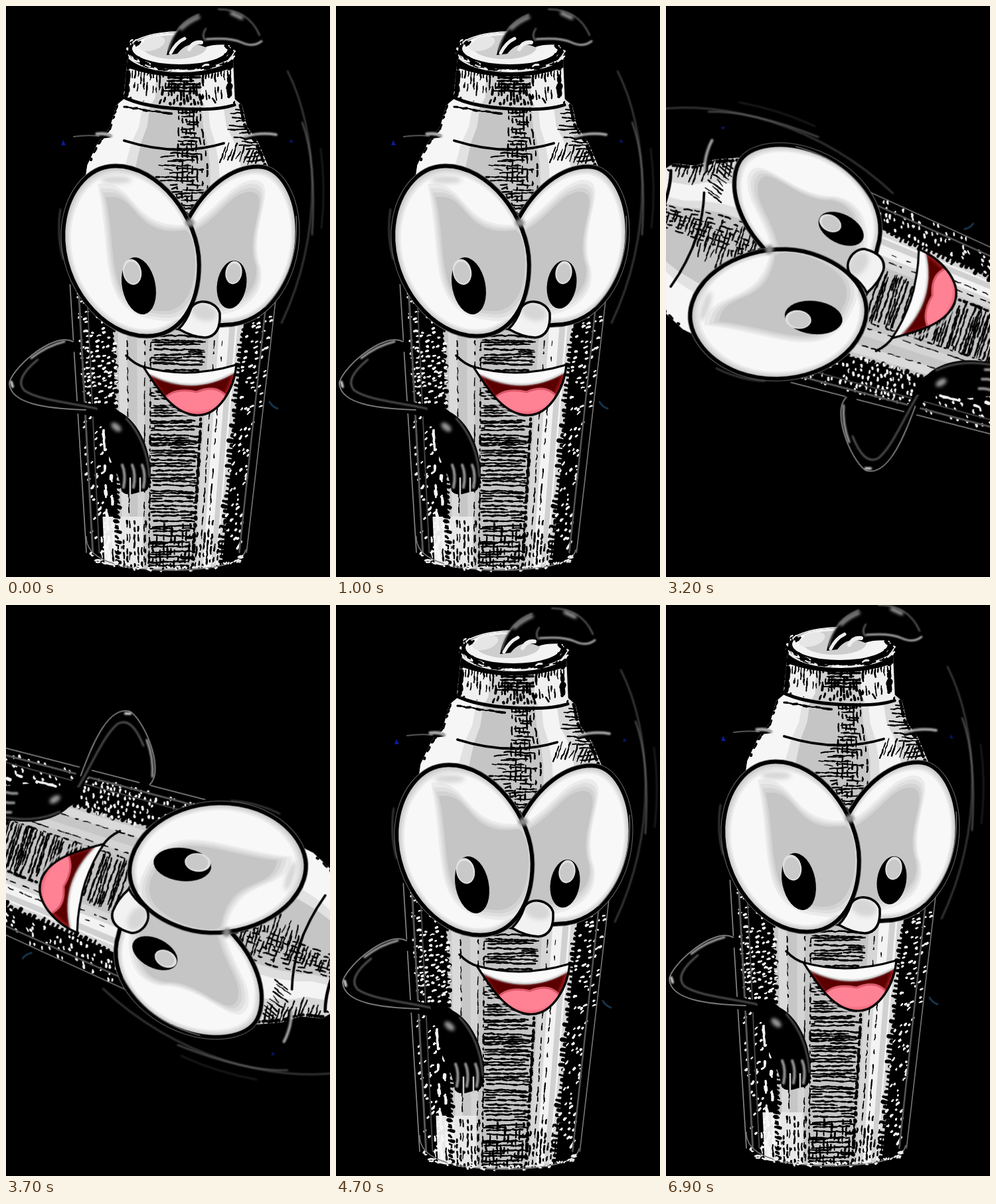
Animation, 488 px wide and 861 px high, one loop 7000 ms. Source, as an HTML page with a canvas:

```html
<!DOCTYPE html>
<html lang="en">
<head>
<meta charset="utf-8">
<title>Dancing shaker</title>
<style>
html, body { margin: 0; width: 100%; height: 100%; overflow: hidden; background: #000; }
canvas { display: block; width: 100%; height: 100%; }
</style>
</head>
<body>
<canvas id="stage" width="488" height="861"></canvas>
<script>
const W = 488, H = 861, LOOP = 7000, STEP = 100;
const stage = document.getElementById('stage').getContext('2d');
const art = document.createElement('canvas');
art.width = W; art.height = H;
const g = art.getContext('2d');
g.lineCap = g.lineJoin = 'round';

let seed = 71;
const rnd = () => (seed = (seed * 16807) % 2147483647) / 2147483647;
const jit = a => (rnd() - 0.5) * 2 * a;
const between = (a, b) => a + (b - a) * rnd();

// The bottle turns around a slightly leaning axis; u runs from -1 (left) to 1 (right).
const profile = [[84, 79], [138, 81], [150, 95], [182, 103], [206, 121], [240, 136], [420, 157], [860, 118]];
const axis = y => 263 - (y - 70) * 0.0275;
function half(y) {
  const i = Math.max(1, profile.findIndex(p => p[0] >= y));
  const [y0, w0] = profile[i - 1], [y1, w1] = profile[i];
  return w0 + (w1 - w0) * (y - y0) / (y1 - y0);
}
const at = (u, y) => axis(y) + u * half(y);

function region(u0, u1, y0, y1) {
  const path = new Path2D();
  for (let y = y0; y <= y1; y += 2) path.lineTo(at(u0, y), y);
  for (let y = y1; y >= y0; y -= 2) path.lineTo(at(u1, y), y);
  path.closePath();
  return path;
}

function fill(path, color) { g.fillStyle = color; g.fill(path); }
function line(path, color, w) { g.strokeStyle = color; g.lineWidth = w; g.stroke(path); }
function oval(x, y, rx, ry, turn, color) {
  g.beginPath(); g.ellipse(x, y, rx, ry, turn, 0, 7);
  g.fillStyle = color; g.fill();
}
function soft(r, draw) { g.filter = `blur(${r}px)`; draw(); g.filter = 'none'; }
function glow(d, color, w, r = 0.8) { soft(r, () => line(new Path2D(d), color, w)); }
function clipped(path, draw) { g.save(); g.clip(path); draw(); g.restore(); }
function scaled(path, k, x, y) {
  const out = new Path2D();
  out.addPath(path, new DOMMatrix([k, 0, 0, k, x * (1 - k), y * (1 - k)]));
  return out;
}

// Ragged pen stroke of uneven width.
function scratch(x1, y1, x2, y2, w, color = '#000') {
  const n = Math.max(2, Math.round(Math.hypot(x2 - x1, y2 - y1) / 5));
  g.strokeStyle = color;
  let x = x1, y = y1;
  for (let i = 1; i <= n; i++) {
    g.beginPath(); g.moveTo(x, y);
    x = x1 + (x2 - x1) * i / n + jit(0.8);
    y = y1 + (y2 - y1) * i / n + jit(0.8);
    g.lineTo(x, y);
    g.lineWidth = w * between(0.6, 1.4);
    g.stroke();
  }
}

// Broken upright strokes along the bottle wall.
function grain(u, y0, y1, gap, w, color) {
  for (let y = y0; y < y1; y += gap * between(0.6, 1.6)) {
    const end = Math.min(y1, y + gap * between(0.2, 0.8));
    scratch(at(u, y), y, at(u, end), end, w, color);
  }
}

function specks(u0, u1, y0, y1, chance, tilt) {
  for (let y = y0; y < y1; y += 7.5)
    for (let u = u0; u < u1; u += 0.055) {
      if (rnd() > chance) continue;
      const x = at(u, y) + jit(2), len = between(1, 5), top = y + jit(2.5);
      scratch(x, top, x + len * Math.cos(tilt), top + len * Math.sin(tilt), 2.7, '#f8f8f8');
    }
}

function lowerBody() {
  const shell = region(-1, 1, 380, 826);
  shell.ellipse(242, 826, 121, 24, 0, 0, Math.PI * 2, true);
  clipped(shell, () => {
    const bands = [[-0.6, -0.22, '#c6c6c6'], [-0.55, -0.46, '#dadada'], [-0.36, -0.28, '#d4d4d4'],
      [-0.22, 0.38, '#c4c4c4'], [0.36, 0.7, '#d6d6d6'], [0.46, 0.64, '#f3f3f3'], [0.56, 0.62, '#d0d0d0']];
    for (const [a, b, color] of bands) fill(region(a, b, 430, 858), color);
    fill(region(-0.78, -0.3, 770, 858), '#e8e8e8');

    for (let y = 488; y < 850; y += 7.6) {
      const l = at(-0.21, y), r = at(0.33, y);
      scratch(l + rnd() * 6, y + jit(2), r - rnd() * 10, y + jit(2), 2.5);
      if (rnd() < 0.6) scratch(l, y + 4, between(l, r), y + 4 + jit(1), 2.2);
      if (rnd() < 0.6) scratch(between(l + 30, r), y + 3, r, y + 3, 2.4);
      scratch(at(-0.6, y) - 4, y, at(-0.6, y) + rnd() * 4, y + 2, 5);
      scratch(at(0.7, y) - rnd() * 7, y, at(0.7, y) + 6, y + 2, 5);
    }
    grain(-0.22, 490, 845, 9, 2.4);
    grain(0.33, 585, 845, 8, 4);
    for (const u of [-0.46, -0.28, 0.42, 0.5]) grain(u, 505, 840, 17, 1.6);

    specks(-0.93, -0.58, 425, 600, 0.66, -0.3);
    specks(-0.94, -0.62, 600, 830, 0.33, -0.7);
    specks(0.73, 0.97, 470, 610, 0.5, -0.4);
    specks(0.71, 0.93, 610, 825, 0.45, -0.9);
    for (const u of [-0.66, -0.73]) grain(u, 640, 840, 26, 4, '#f4f4f4');
    for (let u = -0.85; u < 0.75; u += 0.045)
      grain(u, between(775, 825), 850, 14, 2.4, u < -0.55 && rnd() < 0.5 ? '#f8f8f8' : '#000');
  });
  for (const [u, color, w] of [[-1, '#8a8a8a', 1.6], [-0.92, '#555', 3], [-0.84, '#444', 2], [0.9, '#555', 2.5], [0.99, '#777', 1.6]])
    soft(0.6, () => line(region(u, u, 420, 824), color, w));
  glow('M121 800 Q120 848 242 851 Q356 850 361 820', '#777', 1.6, 0.5);
  for (let i = 0; i < 65; i++) {
    const a = between(0.25, 2.9);
    const x = 242 + 117 * Math.cos(a), y = 824 + 25 * Math.sin(a) + jit(4);
    scratch(x, y, x + rnd() * 4, y + jit(2), 2, '#eee');
  }
}

function shoulders() {
  const shape = region(-1, 1, 140, 338);
  fill(shape, '#d8d8d8');
  clipped(shape, () => {
    const bands = [[-1, -0.5, '#f6f6f6'], [-0.58, -0.46, '#e2e2e2'], [-0.46, 0.36, '#c5c5c5'],
      [0.36, 0.46, '#dedede'], [0.46, 0.7, '#f4f4f4']];
    for (const [a, b, color] of bands) fill(region(a, b, 140, 338), color);
    for (let y = 156; y < 330; y += 6) {
      const w = y < 205 ? 16 : 26;
      scratch(275 - w * rnd(), y + jit(2), 277 + w * rnd(), y + jit(2), 2.3);
      if (y > 215) scratch(between(223, 250), y, between(250, 275), y + jit(2), 2);
      const u = between(0.68, 0.9);
      if (y < 240) scratch(at(u, y), y, at(1, y), y + jit(3), 2);
    }
    for (let u = 0; u < 0.36; u += 0.055) grain(u, 154, 325, 16, 2.2);
    for (let x = 322; x < 382; x += 6) scratch(x, 240 - rnd() * 10, x + 8, between(206, 220), 2);
    for (const u of [-0.99, 0.97]) grain(u, 150, 240, 10, 4);
  });
  line(new Path2D('M174 136 Q205 152 262 155 T344 149'), '#000', 5);
  scratch(178, 152, 250, 163, 2.8);
  line(new Path2D('M178 203 Q258 228 328 207'), '#000', 3.8);
}

function neck() {
  const shape = new Path2D('M183 80 Q262 110 342 80 L345 147 Q262 162 177 136 Z');
  fill(shape, '#f0f0f0');
  clipped(shape, () => {
    fill(region(-0.45, 0.4, 84, 160), '#cfcfcf');
    for (let u = -0.96; u < 1; u += 0.058) {
      const mid = Math.abs(u - 0.04) < 0.4;
      grain(u, 98, mid ? 148 : between(122, 150), mid ? 15 : 26, mid ? 3.2 : 2.1);
    }
    for (let y = 98; y < 132; y += 5) scratch(between(236, 248), y, between(282, 300), y, 3);
    line(new Path2D('M182 86 Q262 114 343 86'), '#000', 13);
    for (const u of [-0.99, 0.93]) grain(u, 88, 148, 12, 7);
  });
}

function cap() {
  oval(263, 69, 83, 31, 0, '#e8e8e8');
  oval(263, 68, 79, 28, 0, '#000');
  oval(262, 64, 72, 24, 0, '#f3f3f3');
  oval(254, 62, 48, 18, 0, '#cecece');
  oval(220, 57, 20, 10, -0.3, '#e6e6e6');
  for (let i = 0; i < 95; i++) {
    const a = between(-0.5, 3.7), r = between(0.84, 1.05);
    const x = 263 + 82 * r * Math.cos(a), y = 68 + 29 * r * Math.sin(a);
    scratch(x, y, x - 9 * Math.sin(a), y + 4 * Math.cos(a), between(1.5, 4), rnd() < 0.75 ? '#000' : '#fff');
  }
}

function raisedArm() {
  glow('M424 98 C470 190 480 340 415 478', '#4d4d4d', 2);
  glow('M446 175 C466 230 464 300 461 345', '#777', 1.6);
  glow('M474 215 Q482 275 475 335', '#303030', 1.5);
  fill(new Path2D('M242 74 C250 30 290 3 330 3 C365 5 385 40 387 56 C365 66 325 52 300 62 Q275 50 258 72 Z'), '#000');
  glow('M245 67 Q254 27 290 13', '#777', 2.2);
  glow('M264 34 Q274 24 290 17', '#999', 5, 2);
  glow('M320 5 Q365 5 382 44', '#666', 2.2);
  glow('M340 11 L355 18', '#aaa', 5, 2);
  glow('M302 50 Q338 47 355 55 T385 53', '#aaa', 3, 1);
  glow('M300 52 Q294 44 301 34', '#777', 2, 1);
  glow('M248 71 Q256 55 269 49', '#eee', 5, 0.7);
  glow('M276 65 Q282 53 294 55', '#eee', 6, 0.7);
}

function hipArm() {
  line(new Path2D('M100 513 C60 520 14 555 14 572 C20 600 110 600 160 617'), '#000', 18);
  glow('M101 506 C70 490 5 550 5 570 C8 600 60 607 120 609', '#777', 2, 0.7);
  glow('M88 506 Q62 512 38 531', '#aaa', 3, 1);
  glow('M48 533 C25 552 16 568 28 580 C50 595 100 598 150 610', '#626262', 2.4, 1);
  glow('M8 567 L10 574', '#ccc', 4, 1.2);
  fill(new Path2D('M137 605 C185 600 215 650 218 700 Q218 735 205 732 L190 736 Q178 738 174 731 C168 690 150 690 149 640 Z'), '#000');
  soft(2.5, () => oval(166, 635, 9, 5, 0.7, '#999'));
  glow('M181 622 Q212 655 216 710', '#666', 2, 1);
  for (let i = 0; i < 3; i++) {
    const x = 178 + 15 * i;
    glow(`M${x - 3} 692 q6 14 2 34`, '#999', 4, 1.2);
    if (i) glow(`M${x - 6} 712 v24`, '#ccc', 2.5, 0.6);
  }
}

function brows() {
  line(new Path2D('M103 195 Q130 200 156 196 M360 200 Q380 195 405 196'), '#000', 5);
  glow('M102 197 Q122 194 140 196', '#555', 2, 0.7);
  glow('M137 193 Q150 191 158 196', '#aaa', 5, 1.2);
  glow('M360 197 Q383 190 407 194', '#aaa', 4, 1);
  fill(new Path2D('M86 202 l4 8 h-7 Z'), '#0b1b96');
  fill(new Path2D('M429 200 l4 6 h-6 Z'), '#0a145c');
  line(new Path2D('M397 597 Q402 605 409 607'), '#16334a', 3);
}

// Glossy eye: nested tones shrink from the rim, then grow around the iris field.
function eye(outline, field, cx, cy) {
  const shape = new Path2D(outline), inner = new Path2D(field);
  line(shape, '#686868', 9);
  line(shape, '#000', 7);
  clipped(shape, () => {
    ['#bcbcbc', '#d0d0d0', '#dedede', '#ebebeb', '#f8f8f8'].forEach((c, i) => fill(scaled(shape, 1 - i * 0.022, cx, cy), c));
    ['#ebebeb', '#dfdfdf', '#d3d3d3', '#c5c5c5'].forEach((c, i) => fill(scaled(inner, 1.2 - i * 0.067, cx, cy), c));
  });
  line(shape, '#000', 4.5);
}

function pupil(x, y, rx, ry, turn, sx, sy, sr) {
  oval(x, y, rx, ry, turn, '#000');
  oval(sx, sy, sr, sr * 1.4, turn, '#e0e0e0');
  oval(sx, sy + 1, sr - 2, sr * 1.4 - 3, turn, '#c9c9c9');
}

function face() {
  eye('M275 322 C300 275 340 243 380 243 C415 243 438 290 438 340 C438 410 395 480 330 480 C250 490 230 400 275 322 Z',
    'M286 338 C325 315 335 286 365 280 C405 280 358 340 376 390 C385 440 330 456 286 452 Z', 338, 370);
  eye('M87 340 C90 285 122 242 165 242 C230 242 290 320 290 390 C290 450 262 497 212 497 C145 497 84 420 87 340 Z',
    'M150 288 C200 280 190 350 270 338 C292 345 297 465 235 460 C145 455 170 380 150 288 Z', 210, 385);
  soft(3, () => oval(166, 262, 23, 6, 0, '#d5d5d5'));
  soft(2, () => oval(277, 327, 7, 6, 0, '#888'));
  glow('M82 306 Q76 345 86 382', '#666', 1.5);
  glow('M437 317 Q442 400 390 454', '#777', 1.3, 0.6);
  pupil(200, 422, 25, 43.5, -0.2, 190, 401, 14);
  pupil(340, 420, 22, 36.5, 0.16, 343, 402, 12.5);

  const nose = new Path2D('M260 487 Q272 476 279 455 C288 440 316 444 322 463 Q324 498 300 500 Q280 499 260 487 Z');
  fill(nose, '#f2f2f2');
  clipped(nose, () => soft(3, () => oval(298, 461, 20, 13, 0.3, '#d6d6d6')));
  line(nose, '#000', 3.5);
}

function mouth() {
  glow('M212 565 Q242 616 289 621', '#ccc', 2.5, 1);
  line(new Path2D('M181 527 Q194 541 210 545'), '#000', 3.5);
  const shape = new Path2D('M207 544 Q273 563 347 541 C344 576 322 616 290 617 C254 618 230 580 207 544 Z');
  fill(shape, '#5a0000');
  clipped(shape, () => {
    glow('M216 558 Q236 594 258 608 M343 557 Q336 585 318 604', '#a51b20', 6, 2);
    const tongue = new Path2D('M235 596 Q250 574 287 582 Q320 568 336 594 L311 623 H262 Z');
    fill(tongue, '#ff8294');
    line(tongue, '#d95768', 3);
    glow('M250 605 Q289 624 321 604', '#ed6779', 4, 1.5);
    fill(new Path2D('M200 535 L350 530 L344 553 Q282 590 214 554 Z'), '#fafafa');
    glow('M217 556 Q282 588 343 553', '#bbb', 2.5, 0.8);
  });
  line(shape, '#000', 3.2);
}

// Each second has its own move, held in tenths.
function pose(n) {
  const sec = Math.floor(n / 10), k = n % 10;
  const early = k === 1 || k === 6, late = k === 4 || k === 9;
  if (sec === 0) return early ? [5, -5, 0] : late ? [-5, 0, 0] : [0, 0, 0];
  if (sec === 1 || sec === 6) return [0, early ? 5 : late ? -5 : 0, 0];
  if (sec === 3) return [0, 0, -k * Math.PI / 5];
  if (sec === 4) return [Math.round(-5 * Math.sin(k * Math.PI / 2)), 0, 0];
  return [0, 0, 0];
}

function render(ms) {
  const [dx, dy, turn] = pose(Math.floor((ms % LOOP) / STEP));
  stage.setTransform(1, 0, 0, 1, 0, 0);
  stage.fillStyle = '#000';
  stage.fillRect(0, 0, W, H);
  stage.translate(W / 2 + dx, H / 2 + dy);
  stage.rotate(turn);
  stage.drawImage(art, -W / 2, -H / 2);
}

[lowerBody, shoulders, neck, cap, raisedArm, hipArm, brows, face, mouth].forEach(draw => draw());
const start = performance.now();
function tick() {
  render(performance.now() - start);
  requestAnimationFrame(tick);
}
tick();
</script>
</body>
</html>
```
